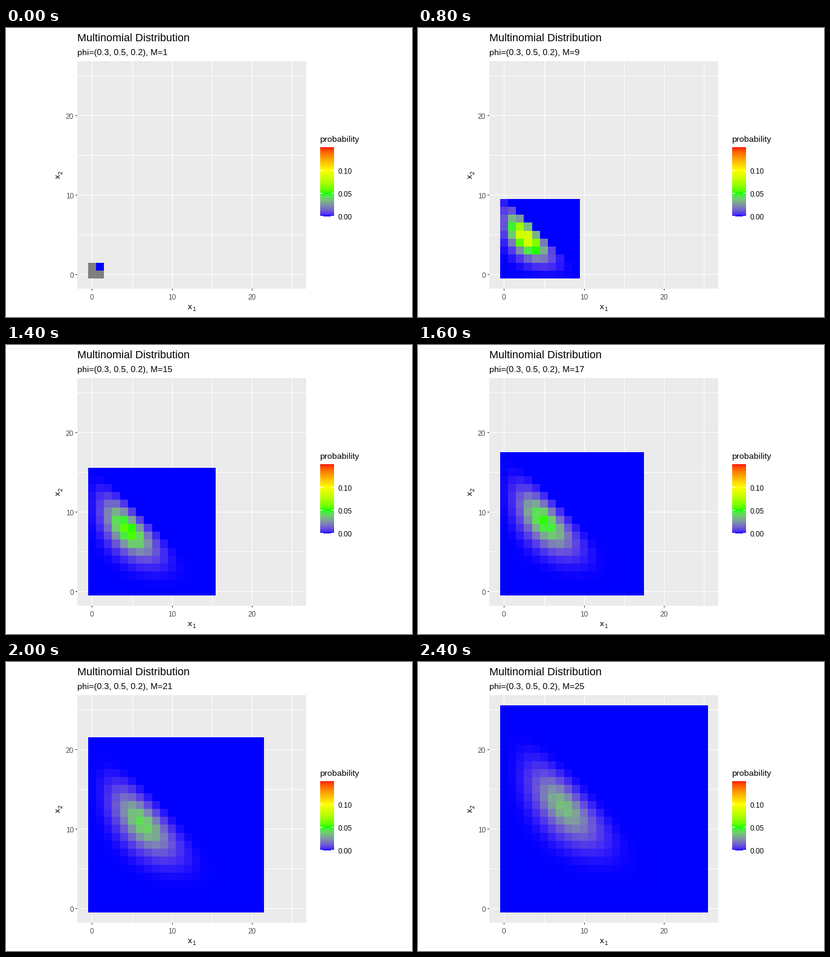
A matplotlib script for the animation above (2500 ms loop, 672 by 480 pixels).

```python
from math import exp, factorial, log

import matplotlib.pyplot as plt
import numpy as np
from matplotlib.animation import FuncAnimation
from matplotlib.patches import Rectangle

plt.rcParams["font.family"] = "Liberation Sans"
plt.rcParams["text.hinting"] = "native"

W, H, DPI = 672, 480, 96
PHI = (0.3, 0.5, 0.2)
M_MAX = 25
P_MAX = 0.15
X0, Y0, CELL = 142.4, 409.4, 13.23  # pixel centre of the (0, 0) tile, tile size
LEFT, RIGHT, TOP, BOTTOM = 118, 497, 55, 433

RGB_XYZ = np.array([[0.4124564, 0.3575761, 0.1804375],
                    [0.2126729, 0.7151522, 0.0721750],
                    [0.0193339, 0.1191920, 0.9503041]])
WHITE = RGB_XYZ.sum(axis=1)


def rgb_to_lab(rgb):
    rgb = np.asarray(rgb, float)
    lin = np.where(rgb > 0.04045, ((rgb + 0.055) / 1.055) ** 2.4, rgb / 12.92)
    t = lin @ RGB_XYZ.T / WHITE
    f = np.where(t > 0.008856, np.cbrt(t), 7.787 * t + 16 / 116)
    x, y, z = np.moveaxis(f, -1, 0)
    return np.stack([116 * y - 16, 500 * (x - y), 200 * (y - z)], axis=-1)


def lab_to_rgb(lab):
    l, a, b = np.moveaxis(lab, -1, 0)
    y = (l + 16) / 116
    f = np.stack([y + a / 500, y, y - b / 200], axis=-1)
    t = np.where(f > 0.206893, f ** 3, (f - 16 / 116) / 7.787)
    lin = np.clip((t * WHITE) @ np.linalg.inv(RGB_XYZ).T, 0, 1)
    rgb = np.where(lin > 0.0031308, 1.055 * lin ** (1 / 2.4) - 0.055, 12.92 * lin)
    return np.clip(rgb, 0, 1)


# blue, green, yellow, red
STOPS = rgb_to_lab([(0, 0, 1), (0, 1, 0), (1, 1, 0), (1, 0, 0)])


def fill(p):
    """Colour scale blended in Lab; values above the limit are grey."""
    p = np.asarray(p, float)
    at = np.linspace(0, P_MAX, 4)
    lab = np.stack([np.interp(p, at, STOPS[:, k]) for k in range(3)], axis=-1)
    rgb = lab_to_rgb(lab)
    rgb[p > P_MAX + 1e-12] = 127 / 255
    return rgb


def prob(x1, x2, m):
    x = (x1, x2, m - x1 - x2)
    if x[2] < 0:
        return 0.0
    return exp(log(factorial(m))
               + sum(n * log(q) - log(factorial(n)) for n, q in zip(x, PHI)))


def tiles(m):
    rgba = np.zeros((M_MAX + 1, M_MAX + 1, 4))
    p = [[prob(i, j, m) for i in range(m + 1)] for j in range(m + 1)]
    rgba[:m + 1, :m + 1, :3] = fill(p)
    rgba[:m + 1, :m + 1, 3] = 1
    return rgba


fig = plt.figure(figsize=(W / DPI, H / DPI), dpi=DPI, facecolor="white")
ax = fig.add_axes([0, 0, 1, 1])
ax.axis("off")


def box(x, y, w, h, color):
    ax.add_patch(Rectangle((x, y), w, h, fc=color, lw=0, antialiased=False, zorder=1))


def label(x, y, s, px, color="black", **kw):
    return ax.text(x, y, s, fontsize=px * 72 / DPI, color=color, va="baseline", **kw)


def px_x(v):
    return np.floor(X0 + CELL * np.asarray(v) + 0.5)


def px_y(v):
    return np.floor(Y0 - CELL * np.asarray(v) + 0.5)


# Panel, grid and axes
box(LEFT, TOP, RIGHT - LEFT, BOTTOM - TOP, "#ebebeb")
for v in range(0, 26, 5):
    box(px_x(v), TOP, 1, BOTTOM - TOP, "white")
    box(LEFT, px_y(v), RIGHT - LEFT, 1, "white")
for v in (0, 10, 20):
    box(px_x(v), BOTTOM, 1, 3, "#333333")
    box(LEFT - 3, px_y(v), 3, 1, "#333333")
    label(px_x(v), 451, str(v), 12, "#4d4d4d", ha="center")
    label(112, px_y(v) + 6, str(v), 12, "#4d4d4d", ha="right")

label(118, 22, "Multinomial Distribution", 18)
subtitle = label(118, 45, "", 14.4)
label(301, 467, "x", 14.4)
label(308.5, 470, "1", 10)
label(90, 250.5, "x", 14.4, rotation=90, rotation_mode="anchor")
label(93, 243, "2", 10, rotation=90, rotation_mode="anchor")

# Colour bar
label(519, 189, "probability", 14.4)
bar_rows = P_MAX * (1 - (np.arange(115) + 0.5) / 115)
ax.imshow(fill(bar_rows)[:, None, :], extent=(520, 543, 313, 198),
          aspect="auto", interpolation="nearest", zorder=0.5)
for v, y in ((0.10, 236), (0.05, 274), (0.00, 312)):
    box(520, y, 5, 1, "white")
    box(538, y, 5, 1, "white")
    label(550, y + 6, f"{v:.2f}", 12)

edges = np.arange(M_MAX + 2) - 0.5
mesh = ax.pcolormesh(px_x(edges), px_y(edges), tiles(1), antialiased=False,
                     edgecolors="none", zorder=2)
ax.set_xlim(0, W)
ax.set_ylim(H, 0)


def update(i):
    m = i + 1
    mesh.set_array(tiles(m))
    subtitle.set_text(f"phi=({', '.join(map(str, PHI))}), M={m}")
    return mesh, subtitle


anim = FuncAnimation(fig, update, frames=M_MAX, interval=100, repeat=True,
                     repeat_delay=0, blit=False)
plt.show()
```
